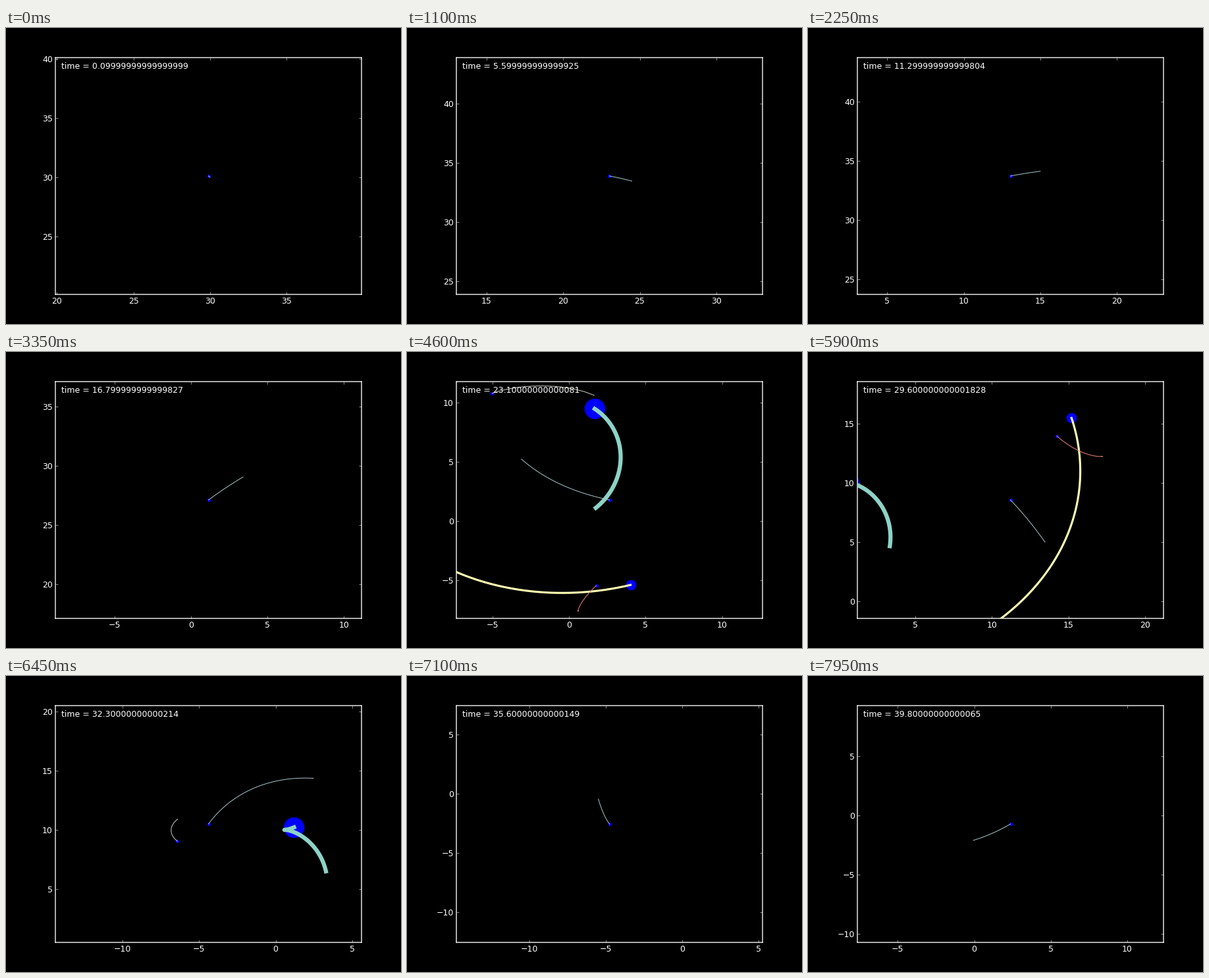
Write a matplotlib script that moves like this. It is 600 px wide and 450 px high and loops after 8000 ms.

```python
import numpy as np
import matplotlib.pyplot as plt
from matplotlib.animation import FuncAnimation
from matplotlib.ticker import MultipleLocator

FRAMES, INTERVAL = 160, 50
DT, STEPS = 0.01, 4000
SECOND = 100                      # steps per unit of time
GM_STAR, GM_GIANT = 200.0, 20.0

clock = np.concatenate([[0.0], np.cumsum(np.full(STEPS, DT))])


def kepler(a, e, rate, t_peri, apse, sense=1):
    """Path on an ellipse around its focus; angles in degrees."""
    mean = np.radians(rate * (clock - t_peri)) % (2 * np.pi)
    ecc = np.full_like(mean, np.pi)
    for _ in range(25):
        ecc -= (ecc - e * np.sin(ecc) - mean) / (1 - e * np.cos(ecc))
    x = a * (np.cos(ecc) - e)
    y = sense * a * np.sqrt(1 - e * e) * np.sin(ecc)
    c, s = np.cos(np.radians(apse)), np.sin(np.radians(apse))
    return np.column_stack([c * x - s * y, s * x + c * y])


# The two heavy bodies circle a barycentre that drifts steadily upwards.
pair = kepler(16.25, 0.088, 13.4, 25.37, -45)
centre = np.array([1.64, -0.24]) + clock[:, None] * np.array([0.011, 0.363])
star = centre - pair * GM_GIANT / (GM_STAR + GM_GIANT)
giant = star + pair
comet = star + kepler(4.3, 0.84, 90.8, 22.0, 3)
moon = giant + kepler(1.89, 0.24, 100.5, 21.79, 330, -1)


def pull(k, p):
    acc = np.zeros(2)
    for gm, body in ((GM_STAR, star), (GM_GIANT, giant)):
        d = body[k] - p
        acc += gm * d / (d @ d + 0.3) ** 1.5
    return acc


def fly(k, p, v, n):
    """Leapfrog over |n| steps from step k, backwards if n < 0."""
    sign = 1 if n > 0 else -1
    h = sign * DT
    path = [p]
    acc = pull(k, p)
    for _ in range(abs(n)):
        v = v + 0.5 * h * acc
        p = p + h * v
        k += sign
        acc = pull(k, p)
        v = v + 0.5 * h * acc
        path.append(p)
    return np.array(path)


def arrival_velocity(k, p, step):
    """Velocity at p for a body that moved by `step` in the last time unit."""
    v = step
    for _ in range(40):
        v = v + 0.7 * (fly(k, p, v, -SECOND)[-1] - (p - step))
    return v


def probe_path():
    # a few waypoints: time, position, last displacement
    stops = [(5.6, (23.02, 33.89), (-1.46, 0.43)),
             (16.8, (1.14, 27.11), (-2.26, -1.94)),
             (23.1, (2.645, 1.80), (5.745, -3.45)),
             (29.6, (11.215, 8.555), (-2.255, 3.555)),
             (32.3, (-4.39, 10.50), (-6.86, -3.86)),
             (39.8, (2.365, -0.72), (2.425, 1.38))]
    path = np.zeros((STEPS + 1, 2))
    k, p, v = 0, np.array([30.0, 30.0]), np.array([-1.0, 1.0])
    for t, here, step in stops:
        k2, p2 = round(t / DT), np.array(here)
        v2 = arrival_velocity(k2, p2, np.array(step))
        n = k2 - k
        ahead = fly(k, p, v, n)
        back = fly(k2, p2, v2, -n)[::-1]
        s = np.clip(np.arange(n + 1) / (n - SECOND), 0, 1)[:, None]
        w = s * s * (3 - 2 * s)
        path[k:k2 + 1] = (1 - w) * ahead + w * back
        k, p, v = k2, p2, v2
    path[k:] = fly(k, p, v, STEPS - k)
    return path


probe = probe_path()

plt.rcParams.update({"font.family": "DejaVu Sans", "font.size": 12})
fig = plt.figure(figsize=(8, 6), dpi=75, facecolor="black")
ax = fig.add_axes([0.125, 0.1, 0.775, 0.8], facecolor="black")
for spine in ax.spines.values():
    spine.set(color="white", linewidth=1.3, snap=False)
ax.tick_params(direction="in", length=4, width=0.5, pad=4, color="white",
               labelcolor="white", labelsize=12, top=True, right=True)
for axis in (ax.xaxis, ax.yaxis):
    axis.set_major_locator(MultipleLocator(5))
label = ax.text(0.02, 0.952, "", transform=ax.transAxes, color="white", zorder=5)

# path, dot size, trail colour, trail width, trail length in time units
bodies = [(star, 30, "#8dd3c7", 6, 15),
          (giant, 15, "#feffb3", 3, 5),
          (comet, 5, "#c6c6be", 1, 1),
          (moon, 5, "#e87f76", 1, 1),
          (probe, 5, "#9fbfc0", 1, 1)]
dots, trails = [], []
for _, size, tint, width, _ in bodies:
    dots += ax.plot([], [], "o", ms=size, color="blue", mew=0, zorder=2)
    trails += ax.plot([], [], color=tint, lw=width, zorder=3,
                      solid_capstyle="projecting", solid_joinstyle="round")


def draw(i):
    k = 10 * (1 + 5 * i // 2)
    for (path, *_, span), dot, trail in zip(bodies, dots, trails):
        dot.set_data(path[k:k + 1, 0], path[k:k + 1, 1])
        part = path[max(0, k - span * SECOND):k + 1][::-5]
        trail.set_data(part[:, 0], part[:, 1])
    x, y = probe[k]
    ax.set_xlim(x - 10, x + 10)
    ax.set_ylim(y - 10, y + 10)
    label.set_text(f"time = {float(clock[k])}")
    return dots + trails + [label]


anim = FuncAnimation(fig, draw, frames=FRAMES, interval=INTERVAL,
                     repeat=True, cache_frame_data=False)
plt.show()
```
